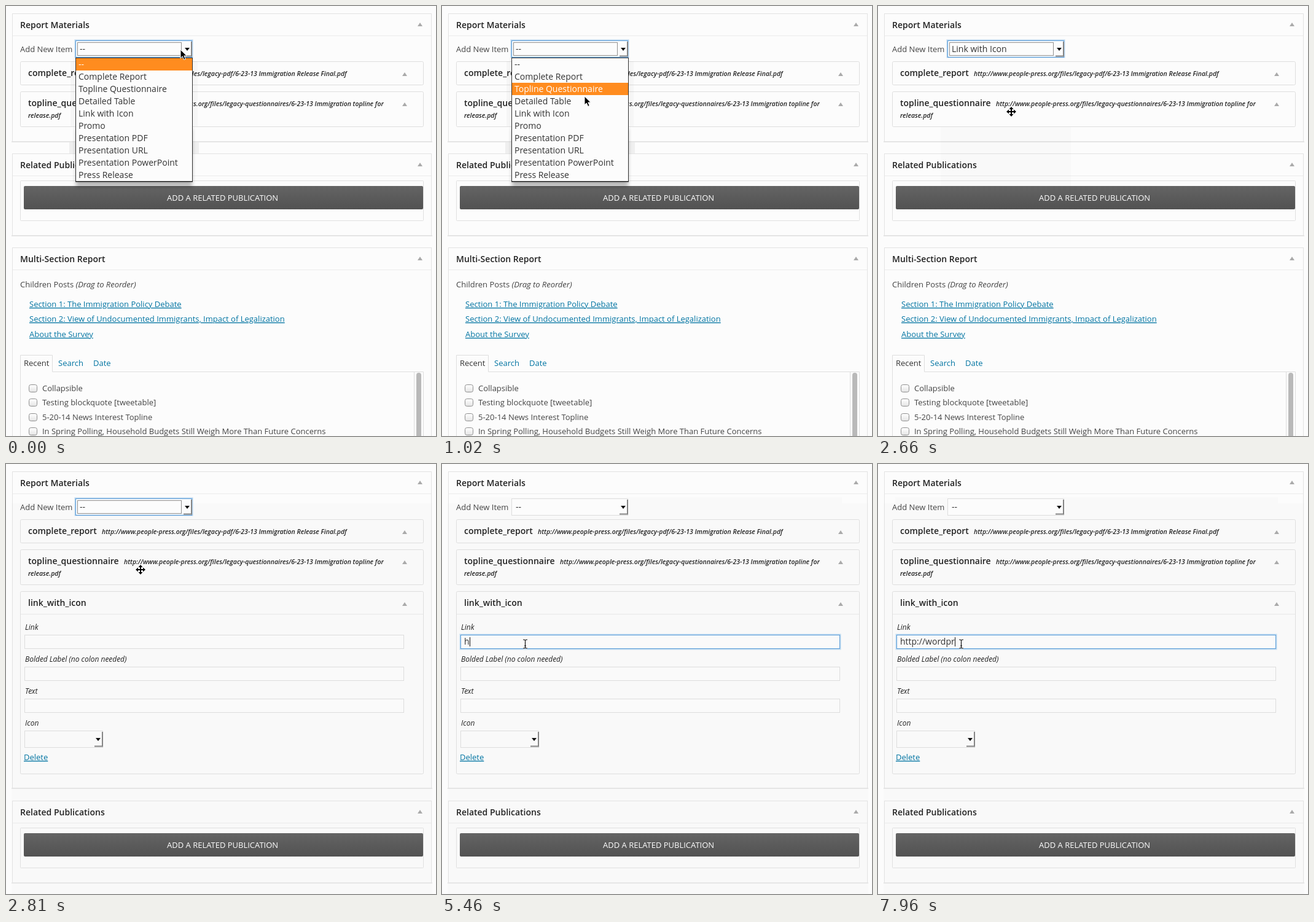
Animation, 700 px wide and 700 px high, one loop 8 s. Source, as an HTML page:

```html
<!DOCTYPE html>
<html lang="en">
<head>
<meta charset="utf-8">
<title>Report materials form</title>
<style>
html, body { margin: 0; width: 100%; height: 100%; overflow: hidden; background: #fcfcfc; }
svg { display: block; width: 100%; height: 100%; }
text { font: 13px "Open Sans", sans-serif; fill: #444; white-space: pre; }
.head { font-size: 14px; font-weight: 600; fill: #222; }
.url { font-size: 10.5px; font-weight: 600; font-style: italic; fill: #222; }
.opt { font-size: 14px; fill: #333; }
.label { font-size: 12px; font-style: italic; fill: #222; }
.link { fill: #0074a2; }
.under { text-decoration: underline; text-decoration-skip-ink: none; }
</style>
</head>
<body>
<svg id="stage" viewBox="0 0 700 700" xmlns="http://www.w3.org/2000/svg"></svg>
<script>
const LOOP = 8000, MENU_END = 2210, FORM_START = 2810, FOCUS = 4570, BLINK_OFF = 5170;

const text = (x, y, s, cls = '', extra = '') => `<text x="${x}" y="${y}" class="${cls}" ${extra}>${s}</text>`;
const rect = (x, y, w, h, fill, extra = '') =>
  `<rect x="${x}" y="${y}" width="${w}" height="${h}" fill="${fill}" ${extra}/>`;
const frame = (x, y, w, h, stroke = '#dedede', fill = 'none', r = 0) =>
  rect(x + .5, y + .5, w, h, fill, `stroke="${stroke}" rx="${r}"`);
const group = (id, s) => `<g id="${id}">${s}</g>`;
const triUp = (x, y) => `<path d="M${x - 4} ${y + 3}h8l-4-6z" fill="#aaa"/>`;
const triDown = (x, y) => `<path d="M${x - 4} ${y - 2}h8l-4 5z" fill="#111"/>`;

function panel(y, h, title) {
  return rect(9, y + h, 685, 2, '#e6e6e6') + frame(10, y, 682, h, '#e3e3e3') +
    rect(11, y + 36, 681, 1, '#ebebeb') + text(23, y + 24, title, 'head') + triUp(674, y + 18);
}

function related(y) {
  return panel(y, 133, 'Related Publications') + frame(23, y + 44, 656, 65, '#e0e0e0', 'none', 1) +
    rect(29, y + 53, 650, 38, 'url(#dark)', 'rx="2"') +
    text(262, y + 77, 'ADD A RELATED PUBLICATION', '', 'style="fill:#fff"');
}

function item(y, h, name) {
  return frame(23, y, 656, h, '#dedede', 'none', 2) + text(36, y + 24, name, 'head') + triUp(649, y + 21);
}

// Drop-down button with its raised lower right corner
function bevel(x, y, w, h) {
  return `<path d="M${x + w - 1} ${y + 2}V${y + h - 1.5}H${x + w - 14}" fill="none" stroke="#858585" stroke-width="2"/>` +
    triDown(x + w - 8, y + h / 2 + .5);
}

function checkRow(y, label) {
  return rect(37.5, y - 10.5, 13, 12, 'url(#box)', 'stroke="#8f8f8f" rx="3"') + text(59, y, label);
}

const options = ['--', 'Complete Report', 'Topline Questionnaire', 'Detailed Table', 'Link with Icon', 'Promo',
  'Presentation PDF', 'Presentation URL', 'Presentation PowerPoint', 'Press Release'];

const defs = `<defs>
<linearGradient id="dark" x2="0" y2="1"><stop stop-color="#646464"/><stop offset="1" stop-color="#525252"/></linearGradient>
<linearGradient id="box" x2="0" y2="1"><stop stop-color="#fff"/><stop offset="1" stop-color="#e4e4e4"/></linearGradient>
<filter id="blur" x="-20%" y="-20%" width="140%" height="140%"><feGaussianBlur stdDeviation="3"/></filter>
</defs>`;

const listPage = panel(12, 208, 'Report Materials') + related(240) + panel(393, 400, 'Multi-Section Report') +
  text(23, 458, 'Children Posts <tspan font-style="italic">(Drag to Reorder)</tspan>') +
  text(38, 490, 'Section 1: The Immigration Policy Debate', 'link under') +
  text(38, 514, 'Section 2: View of Undocumented Immigrants, Impact of Legalization', 'link under') +
  text(38, 539, 'About the Survey', 'link under') +
  '<path d="M23.5 700V568.5H75.5V595.5H679.5V700M664.5 596V700" fill="none" stroke="#dedede"/>' +
  text(29, 586, 'Recent', '', 'style="fill:#333"') + text(85, 586, 'Search', 'link') + text(142, 586, 'Date', 'link') +
  rect(668, 597, 8, 120, '#b9b9b9', 'rx="4"') +
  checkRow(627, 'Collapsible') + checkRow(650, 'Testing blockquote [tweetable]') +
  checkRow(674, '5-20-14 News Interest Topline') +
  checkRow(697, 'In Spring Polling, Household Budgets Still Weigh More Than Future Concerns');

const field = (y, label) => text(31, y - 8, label, 'label') + frame(30, y, 617, 22, '#dddddd', '#fafafa');

const formPage = rect(9, 64, 685, 636, '#f9f9f9') + panel(12, 515, 'Report Materials') + related(548) +
  rect(9, 681, 685, 2, '#e6e6e6') +
  item(207, 297, 'link_with_icon') + rect(24, 244, 655, 1, '#e8e8e8') +
  field(278, 'Link') + field(330, 'Bolded Label (no colon needed)') + field(382, 'Text') +
  text(31, 426, 'Icon', 'label') + frame(30, 434, 127, 27, '#dddddd') + bevel(30, 434, 128, 27) +
  text(29, 482, 'Delete', 'link under');

const items = text(23, 75, 'Add New Item') + item(90, 38, 'complete_report') + item(139, 57, 'topline_questionnaire') +
  text(156, 114, 'http://www.people-press.org/files/legacy-pdf/6-23-13 Immigration Release Final.pdf', 'url') +
  text(192, 163, 'http://www.people-press.org/files/legacy-questionnaires/6-23-13 Immigration topline for', 'url') +
  text(36, 182, 'release.pdf', 'url');

const picker = frame(113, 56, 189, 27, '#dddddd', '#fcfcfc') +
  group('ring', rect(112.5, 55.5, 191, 28, 'none', 'stroke="#8fbfe6" stroke-opacity=".6" stroke-width="2"') +
    frame(113, 56, 189, 27, '#5b9dd9') +
    frame(116, 59, 169, 21, '#222').replace('/>', ' stroke-dasharray="1 1"/>')) +
  bevel(113, 56, 190, 27) + text(120, 75, '--', 'opt', 'id="choice"');

const menu = rect(105, 90, 207, 106, '#000', 'opacity=".025"') + rect(103, 222, 211, 18, '#000', 'opacity=".05"') +
  rect(114, 200, 189, 94, '#000', 'opacity=".28" filter="url(#blur)"') +
  rect(113, 84, 191, 202, '#fcfcfc') + rect(114, 85, 189, 20, '#ff8c1f', 'id="bar"') +
  frame(113, 84, 190, 201, '#333') + rect(113, 285, 191, 1.5, '#222') +
  options.map((s, i) => text(118, 100 + i * 20, s, 'opt')).join('');

const input = rect(29.5, 277.5, 619, 24, 'none', 'stroke="#9cc8ec" stroke-opacity=".6" stroke-width="2"') +
  frame(30, 278, 617, 22, '#5b9dd9', '#fafafa') + text(36, 294, '', 'opt', 'id="typed"') +
  rect(36, 279, 1, 20, '#111', 'id="caret"');

// One arm of the four-way pointer, turned for the others
const arm = 'M-1 0V-4H-3.5L0-8L3.5-4H1V0Z';
const cross = [0, 90, 180, 270].map(a => `<path d="${arm}" transform="rotate(${a})"/>`).join('');
const beam = 'M-3-7H-1.2L.5-6L2.2-7H4M.5-6V6M-3 7H-1.2L.5 6L2.2 7H4M-1 3H2';
const cursors =
  group('arrow', '<path d="M0 0V14L3.3 11L5.7 16.5L8.2 15.4L5.8 10H10.2Z" fill="#000" stroke="#fff" stroke-width="1"/>') +
  group('move', `<g stroke="#fff" stroke-width="2" stroke-linejoin="round">${cross}</g><g fill="#000">${cross}</g>`) +
  group('beam', `<path d="${beam}" fill="none" stroke="#fff" stroke-width="2.4" opacity=".8"/>` +
    `<path d="${beam}" fill="none" stroke="#111" stroke-width="1.2"/>`);

const stage = document.getElementById('stage');
stage.innerHTML = defs + rect(0, 0, 700, 700, '#fcfcfc') + group('list', listPage) + group('form', formPage) +
  group('shade', rect(102, 197, 212, 96, '#000', 'opacity=".012"')) +
  group('calm', rect(28, 54, 623, 10, '#f9f9f9')) +
  items + picker + group('menu', menu) + group('input', input) + group('cursor', cursors);

const el = {};
stage.querySelectorAll('[id]').forEach(n => el[n.id] = n);
const rows = el.menu.querySelectorAll('text');
const show = (id, on) => { el[id].style.display = on ? '' : 'none'; };

// Pointer stops: time, x, y, shape
const stops = [
  [0, 284, 71, 'arrow'], [440, 278, 80, 'arrow'], [590, 268, 95, 'arrow'], [740, 256, 112, 'arrow'],
  [880, 243, 131, 'arrow'], [1020, 232, 147, 'arrow'], [1170, 226, 157, 'arrow'], [1320, 221, 165, 'arrow'],
  [1470, 219, 170, 'arrow'], [1610, 217, 171, 'arrow'], [2510, 217, 172, 'move'], [2810, 219, 172, 'move'],
  [3400, 218, 178, 'move'], [3550, 214, 203, 'arrow'], [3690, 211, 232, 'move'], [3840, 204, 258, 'arrow'],
  [3990, 182, 288, 'beam'], [4130, 160, 304, 'arrow'], [4280, 143, 296, 'beam'], [4420, 135, 293, 'beam']
];
const barSteps = [[0, 0], [740, 1], [880, 2], [1170, 3], [1470, 4]];
const address = 'http://wordpr';
const keyTimes = [5460, 5610, 5760, 5900, 6190, 6490, 6640, 7230, 7380, 7520, 7670, 7820, 7960];
const latest = (list, t) => list.filter(s => s[0] <= t).pop();

function draw(t) {
  const form = t >= FORM_START, open = t < MENU_END, focus = t >= FOCUS;
  show('list', !form);
  show('form', form);
  show('shade', !open && !form);
  show('calm', focus);
  show('ring', !focus);
  show('menu', open);
  show('input', focus);
  el.choice.textContent = open || form ? '--' : options[4];

  const row = latest(barSteps, t)[1];
  el.bar.setAttribute('y', 85 + row * 20);
  rows.forEach((n, i) => { n.style.fill = i === row ? '#fff' : '#333'; });

  const count = keyTimes.filter(k => k <= t).length;
  el.typed.textContent = address.slice(0, count);
  const width = count ? el.typed.getComputedTextLength() : 0;
  el.caret.setAttribute('x', Math.round(36 + width));
  el.caret.setAttribute('y', count ? 282 : 279);
  el.caret.setAttribute('height', count ? 15 : 20);
  show('caret', count > 0 || t < BLINK_OFF);

  const [, x, y, shape] = latest(stops, t);
  el.cursor.setAttribute('transform', `translate(${x} ${y})`);
  ['arrow', 'move', 'beam'].forEach(id => show(id, id === shape));
}

function tick() {
  draw(performance.now() % LOOP);
  requestAnimationFrame(tick);
}
tick();
</script>
</body>
</html>
```
